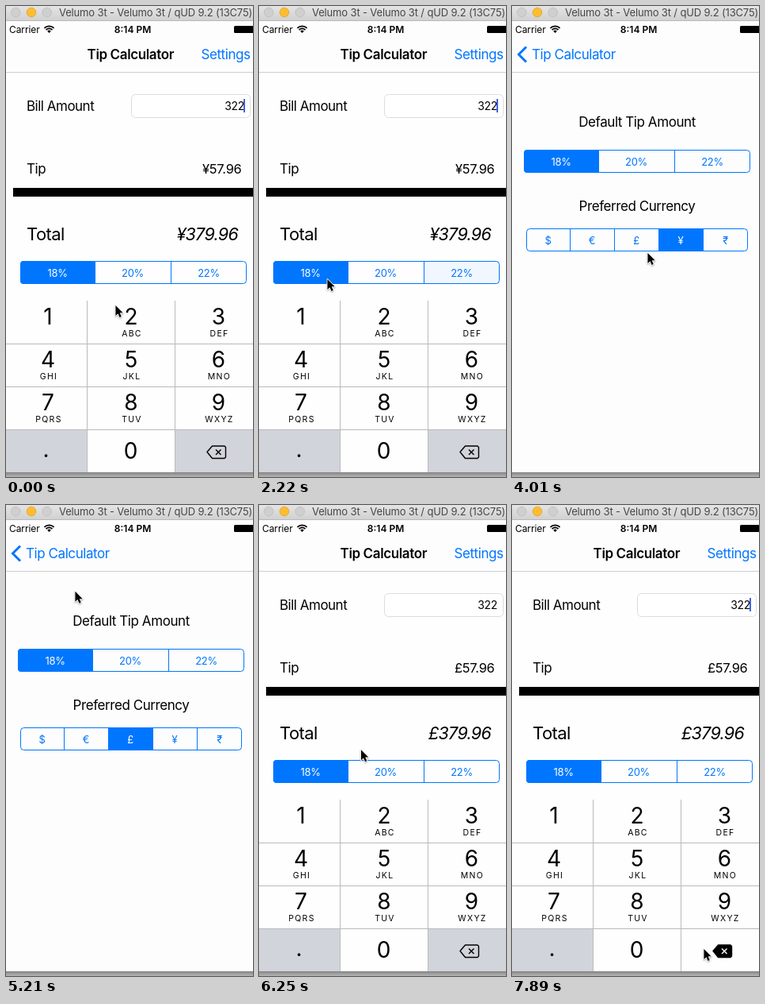
An HTML page with a canvas for the animation above (8 s loop, 312 by 593 pixels).

```html
<!DOCTYPE html>
<html lang="en">
<head>
<meta charset="utf-8">
<title>Tip Calculator</title>
<style>
html, body { margin: 0; width: 100%; height: 100%; overflow: hidden; background: #fff; }
canvas { display: block; width: 312px; height: 593px; }
</style>
</head>
<body>
<canvas id="stage"></canvas>
<script>
const W = 312, H = 593, LOOP = 8000, STEP = 148.8;
const BLUE = '#0076ff', INK = '#000';
const canvas = document.getElementById('stage');
const ctx = canvas.getContext('2d');
const dpr = window.devicePixelRatio || 1;
canvas.width = W * dpr;
canvas.height = H * dpr;

const clamp = v => Math.max(0, Math.min(1, v));
const spring = x => x <= 0 ? 0 : 1 - (1 + x) * Math.exp(-x);

// Pointer path: step, x, y
const path = [
  [0, 137, 376], [3, 156, 342], [5, 160, 337], [8, 236, 341], [10, 250, 338],
  [13, 96, 346], [15, 85, 343], [16, 85, 343], [20, 286, 58], [23, 286, 58],
  [27, 170, 310], [28, 168, 308], [29, 158, 299], [31, 158, 299], [36, 68, 60],
  [38, 72, 61], [39, 114, 65], [43, 132, 388], [45, 132, 388], [47, 212, 396],
  [51, 240, 556], [53, 241, 558]
];

function pointerAt(n) {
  let i = 0;
  while (i < path.length - 2 && path[i + 1][0] <= n) i++;
  const [a, x, y] = path[i], [b, u, v] = path[i + 1];
  const k = clamp((n - a) / (b - a));
  return [x + (u - x) * k, y + (v - y) * k];
}

function rect(x, y, w, h, color) {
  ctx.fillStyle = color;
  ctx.fillRect(x, y, w, h);
}

function text(str, x, y, size, o = {}) {
  ctx.font = `${o.style || ''} ${o.weight || 400} ${size}px Inter, Roboto, sans-serif`;
  ctx.letterSpacing = (o.gap === undefined ? -0.43 : o.gap) + 'px';
  ctx.textAlign = o.align || 'left';
  ctx.fillStyle = o.color || INK;
  ctx.fillText(str, x, y);
}

function faded(alpha, draw) {
  ctx.save();
  ctx.globalAlpha = clamp(alpha);
  draw();
  ctx.restore();
}

function roundRect(x, y, w, h, r) {
  ctx.beginPath();
  ctx.roundRect(x, y, w, h, r);
}

function polyline(points, close) {
  ctx.beginPath();
  points.forEach(([x, y]) => ctx.lineTo(x, y));
  if (close) ctx.closePath();
}

// Segmented control; `old` fades out during the steps after a change
function segments(edges, y, labels, sel, old, age) {
  const x = edges[0], w = edges[edges.length - 1] - x;
  ctx.save();
  roundRect(x, y, w, 29, 4);
  ctx.clip();
  rect(edges[sel], y, edges[sel + 1] - edges[sel], 29, BLUE);
  if (old >= 0 && age < 2)
    faded(age ? 0.05 : 0.3, () => rect(edges[old], y, edges[old + 1] - edges[old], 29, BLUE));
  edges.slice(1, -1).forEach(e => rect(e, y, 1, 29, BLUE));
  ctx.restore();
  ctx.strokeStyle = BLUE;
  ctx.lineWidth = 1;
  roundRect(x + 0.5, y + 0.5, w - 1, 28, 4);
  ctx.stroke();
  labels.forEach((s, i) => text(s, (edges[i] + edges[i + 1]) / 2, y + 19.5, 13,
    { align: 'center', gap: -0.3, color: i === sel ? '#fff' : BLUE }));
}

const rates = ['18%', '20%', '22%'];
const taps = [[0, 0], [4, 1], [9, 2], [14, 0]];

function lastTap(n) {
  let i = taps.length - 1;
  while (taps[i][0] > n) i--;
  return { sel: taps[i][1], old: i ? taps[i - 1][1] : -1, age: n - taps[i][0] };
}

function backspace(pressed) {
  const box = [[254, 561.5], [260.5, 554], [276, 554], [277.5, 555.5],
    [277.5, 568], [276, 569.5], [260.5, 569.5]];
  ctx.lineJoin = 'round';
  ctx.lineWidth = 1.4;
  ctx.strokeStyle = ctx.fillStyle = INK;
  polyline(box, true);
  if (pressed) ctx.fill();
  ctx.stroke();
  if (pressed) ctx.strokeStyle = '#fff';
  polyline([[265, 558.5], [271.5, 565]]);
  ctx.stroke();
  polyline([[271.5, 558.5], [265, 565]]);
  ctx.stroke();
}

function keypad(n) {
  const gray = '#d1d4da', line = '#b8babd';
  const erase = n >= 52;
  rect(-10, 371, 330, 216, '#fefefe');
  rect(-10, 534, 112, 53, gray);
  if (!erase) rect(214, 534, 110, 53, gray);
  if (n === 43) rect(103, 371, 110, 54, gray);
  [425, 479, 533].forEach(y => rect(-10, y, 330, 1, line));
  [102, 213].forEach(x => rect(x, 371, 1, 216, line));
  const letters = ['', 'ABC', 'DEF', 'GHI', 'JKL', 'MNO', 'PQRS', 'TUV', 'WXYZ'];
  letters.forEach((s, i) => {
    const x = [53, 158, 268.5][i % 3], y = 401 + 54 * Math.floor(i / 3);
    text(String(i + 1), x, y, 28, { align: 'center', gap: 0 });
    text(s, x + 1, y + 15, 10.5, { align: 'center', gap: 1.3 });
  });
  text('0', 157.5, 570, 28, { align: 'center', gap: 0 });
  text('.', 50.5, 568, 28, { align: 'center', gap: 0 });
  backspace(erase);
}

function home(n, dx) {
  const bill = n >= 43 && n < 52 ? 3222 : 322;
  const sign = n >= 41 ? '£' : '¥';
  const { sel, old, age } = lastTap(n);
  const tip = bill * (18 + 2 * sel) / 100;
  ctx.save();
  ctx.translate(dx, 0);
  text('Bill Amount', 26, 132, 17, { gap: -0.5 });
  roundRect(158.5, 111.5, 150, 29, 5);
  ctx.fillStyle = '#fff';
  ctx.fill();
  ctx.strokeStyle = '#dcdcdc';
  ctx.lineWidth = 1;
  ctx.stroke();
  text(String(bill), 301, 131, 14, { align: 'right', gap: -0.3 });
  const blink = (n * STEP) % 1060 < 600;
  if (n >= 43 || blink) rect(300, 117, 2, 17, '#4264e6');
  text('Tip', 26, 211, 17);
  text(sign + tip.toFixed(2), 297.5, 211, 16.5, { align: 'right', gap: -0.3 });
  rect(9, 229, 330, 11, INK);
  text('Total', 26, 295, 22, { gap: -0.6 });
  text(sign + (bill + tip).toFixed(2), 293, 295, 21.5, { align: 'right', gap: -0.7, style: 'italic' });
  segments([18, 112, 208, 304], 321, rates, sel, old, age);
  keypad(n);
  ctx.restore();
}

function settings(n, dx, q) {
  ctx.save();
  ctx.translate(dx, 0);
  const edge = -1;
  const shade = ctx.createLinearGradient(edge - 8, 0, edge, 0);
  shade.addColorStop(0, 'rgba(0,0,0,0)');
  shade.addColorStop(1, 'rgba(0,0,0,.2)');
  // The shadow falls on the page, not on the keyboard
  faded(3 * q, () => rect(edge - 8, 19, 8, 352, shade));
  rect(edge, 19, 330, 568, '#fdfdfd');
  text('Default Tip Amount', 158, 152, 17, { align: 'center' });
  segments([15, 109, 205, 301], 181, rates, 0, -1, 9);
  text('Preferred Currency', 158, 258, 17, { align: 'center' });
  const picked = n >= 31;
  segments([18, 73, 129, 185, 241, 298], 280, ['$', '€', '£', '¥', '₹'],
    picked ? 2 : 3, picked ? 3 : -1, n - 31);
  ctx.restore();
}

function navBar(n, q) {
  const back = n >= 37;
  rect(0, 19, W, 64, 'rgba(253,253,253,.6)');
  rect(0, 83, W, 1, '#cfcfcf');
  if (q > 0.01 && q < 0.5) {
    const x = Math.round(318 - 320 * q + (back ? -17 : 16));
    const g = ctx.createLinearGradient(x, 0, W, 0);
    g.addColorStop(0, 'rgba(0,0,0,.03)');
    g.addColorStop(1, back ? 'rgba(0,0,0,.05)' : 'rgba(0,0,0,.25)');
    rect(x, 19, W - x, 64, g);
  }
  let title = (1 - q) ** 2, link = 1 - 3 * q;
  if (n === 22) link = 0.3;
  if (back) {
    title = clamp((n - 37.9) / 4);
    link = n > 41 ? 1 : title * 0.8;
  }
  faded(title, () => text('Tip Calculator', 157.3 - 55 * q, 67, 17,
    { align: 'center', weight: 600, gap: -0.38 }));
  faded(link, () => text('Settings', 246.5, 67, 17, { color: BLUE }));
  faded(q * q, () => {
    ctx.strokeStyle = BLUE;
    ctx.lineWidth = 3;
    ctx.lineJoin = 'miter';
    polyline([[18, 51.5], [8.5, 61], [18, 70.5]]);
    ctx.stroke();
  });
  faded((q - 0.4) / 0.6, () => text('Tip Calculator', 25 + 80 * (1 - q), 67, 17, { color: BLUE }));
}

function statusBar() {
  text('Carrier', 4, 33.5, 12, { gap: -0.1 });
  ctx.strokeStyle = INK;
  ctx.lineWidth = 1.7;
  [8.6, 5.6].forEach(r => {
    ctx.beginPath();
    ctx.arc(54.5, 34, r, -Math.PI * 0.75, -Math.PI * 0.25);
    ctx.stroke();
  });
  ctx.fillStyle = INK;
  ctx.beginPath();
  ctx.moveTo(54.5, 34);
  ctx.arc(54.5, 34, 3.2, -Math.PI * 0.75, -Math.PI * 0.25);
  ctx.fill();
  text('8:14 PM', 160, 33.5, 12, { align: 'center', weight: 600, gap: 0 });
  roundRect(288, 25, 28, 9, 1.5);
  ctx.fillStyle = INK;
  ctx.fill();
}

function windowFrame() {
  let g = ctx.createLinearGradient(0, 0, 0, 19);
  g.addColorStop(0, '#e4e4e4');
  g.addColorStop(1, '#d0d0d0');
  rect(0, 0, W, 19, g);
  rect(0, 18, W, 1, '#b9b9b9');
  ['#cfcfcf', '#fdbd2e', '#cfcfcf'].forEach((c, i) => {
    ctx.beginPath();
    ctx.arc(12.3 + 19.7 * i, 8, 5.8, 0, 7);
    ctx.fillStyle = c;
    ctx.fill();
    ctx.strokeStyle = i === 1 ? '#e0a32e' : '#bcbcbc';
    ctx.lineWidth = 0.8;
    ctx.stroke();
  });
  text('Velumo 3t - Velumo 3t / qUD 9.2 (13C75)', 67, 13, 13, { color: '#464646', gap: -0.15 });
  g = ctx.createLinearGradient(0, 587, 0, 593);
  g.addColorStop(0, '#858585');
  g.addColorStop(1, '#b4b4b4');
  rect(0, 587, W, 6, g);
}

function pointer(x, y) {
  ctx.save();
  ctx.translate(x + 1, y + 1);
  ctx.scale(0.86, 0.86);
  polyline([[0.5, 0], [0.5, 15], [4, 11.8], [6.5, 17.3], [9, 16.2], [6.7, 10.9], [11.3, 10.9]], true);
  ctx.lineJoin = 'round';
  ctx.shadowColor = 'rgba(0,0,0,.35)';
  ctx.shadowBlur = 2 * dpr;
  ctx.shadowOffsetY = dpr;
  ctx.strokeStyle = '#fff';
  ctx.lineWidth = 2;
  ctx.stroke();
  ctx.shadowColor = 'transparent';
  ctx.fillStyle = INK;
  ctx.fill();
  ctx.restore();
}

function render(t) {
  const n = Math.min(53, Math.floor((t + 15) / STEP));
  // q: 0 shows the calculator, 1 the settings
  let q = n < 37 ? spring(1.02 + (n - 23) * 2.08) : 1 - spring(4.14 + (n - 39) * 2.08);
  if (n >= 27 && n < 37) q = 1;
  if (n < 23 || n >= 42) q = 0;
  ctx.setTransform(dpr, 0, 0, dpr, 0, 0);
  rect(0, 0, W, H, '#fefefe');
  if (q < 1) {
    home(n, Math.round(-96 * q));
    rect(0, 19, W, 568, `rgba(0,0,0,${0.06 * q})`);
  }
  if (q > 0) settings(n, Math.round(320 * (1 - q)), q);
  navBar(n, q);
  statusBar();
  windowFrame();
  pointer(...pointerAt(n));
}

const start = performance.now();
function tick() {
  render((performance.now() - start) % LOOP);
  requestAnimationFrame(tick);
}
render(0);
requestAnimationFrame(tick);
</script>
</body>
</html>
```
